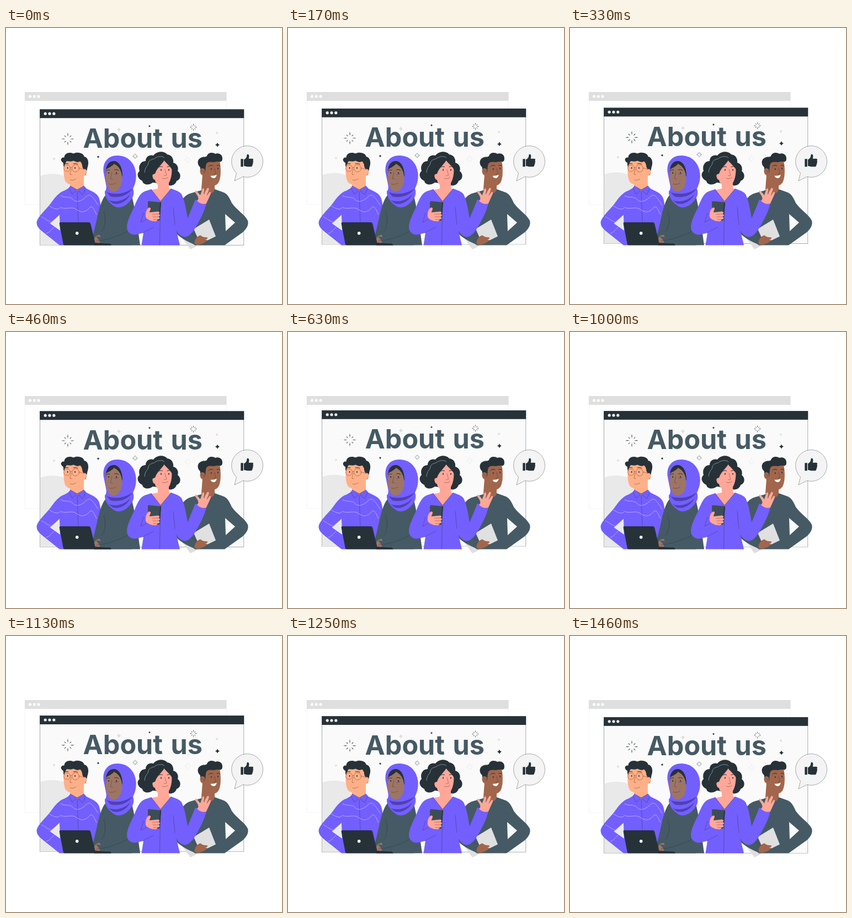
Write an HTML page that moves like this. It is 500 px wide and 500 px high and loops after 1.5 s.

```html
<!DOCTYPE html>
<html lang="en">
<head>
<meta charset="utf-8">
<title>About us</title>
<style>
  html, body { margin: 0; width: 100%; height: 100%; overflow: hidden; background: #fff; }
  svg { display: block; width: 100vw; height: 100vh; }
  #window { animation: float 1500ms linear infinite; }
  @keyframes float { 50% { transform: translateY(-6.5px); } }
  .title { font: 700 48.5px Inter, "Open Sans", sans-serif; fill: #455a64; word-spacing: 3px; }
  .dark { fill: #263238; }
  .slate { fill: #455a64; }
  .purple { fill: #735fff; }
  .shade { fill: #4f41b5; }
  .peach { fill: #ffb088; }
  .rose { fill: #ffa799; }
  .brown { fill: #9e7565; }
  .tan { fill: #a1664c; }
  .white { fill: #fff; }
  .line { fill: none; stroke: #263238; stroke-width: .4; stroke-linecap: round; stroke-linejoin: round; }
  .bold { stroke-width: 1; }
  .pale { stroke: #dcd7ff; stroke-width: .6; }
  .warm { stroke: #8f4f3c; stroke-width: .6; }
</style>
</head>
<body>
<svg viewBox="0 0 500 500" xmlns="http://www.w3.org/2000/svg">
  <g id="back">
    <rect x="34.2" y="116.4" width="365" height="203.4" fill="#fff" stroke="#ececec" stroke-width=".6"/>
    <rect x="34" y="116" width="365.4" height="16" fill="#dfdfdf"/>
    <g class="white"><circle cx="43.6" cy="124" r="2.6"/><circle cx="51.3" cy="124" r="2.6"/><circle cx="59" cy="124" r="2.6"/></g>
  </g>

  <g id="window">
    <rect x="61.5" y="147.6" width="369.4" height="246" fill="#fafafa" stroke="#263238" stroke-width=".4"/>
    <path d="M61.8 268C76 262.5 98 262.5 114 272L150 393.4H61.8Z" fill="#e9e9e9"/>
    <rect class="dark" x="61.2" y="147.4" width="370" height="15.8"/>
    <g fill="#f0f0f0"><circle cx="71.2" cy="155.2" r="2.6"/><circle cx="79" cy="155.2" r="2.6"/><circle cx="86.8" cy="155.2" r="2.6"/></g>
    <g id="sparks"></g>
    <text class="title" x="139.6" y="216.8">About us</text>
  </g>

  <g id="bubble">
    <path d="M417.5 262.5A28.4 28.4 0 1 1 429.5 269.3L414 277Z" fill="#f4f4f4" stroke="#263238" stroke-width=".4" stroke-linejoin="round"/>
    <path class="dark" d="M425.3 237.2H429.8V251.2H425.3ZM431 238.2C434.5 237 436.5 233.5 436.3 230.5C436.3 228.3 439.7 228 440.3 231.2C440.6 233.5 440 235.3 439.6 236.8H445.8C448.3 236.8 448.7 239.5 447.2 240.5C448.6 241.5 448.4 243.7 447 244.3C448 245.5 447.4 247.3 446.2 247.8C446.8 249.8 445.6 251.2 443.6 251.2H437C434.5 251.2 433.5 250 431 250Z"/>
  </g>

  <g id="man-glasses">
    <path class="purple" fill-rule="evenodd" d="M117 288L106 294.5C95 298 88 308 80 319C71 330 58 342 55.6 351C55 358 59 363 65 368L97 393.5H176L171 319C170 308 167 302 158 297L142 289ZM97 338.5L79.5 354L98 367Z"/>
    <path class="peach" d="M116 266H141V287C140 291 134 294 129 295C123 294 117 291 116 287Z"/>
    <path class="peach" d="M105.5 243C103.5 257 104 275 110 280.5C116 285.5 127 286 133 279C136 276 138 272 139.5 268C147 268 149 257 142 256L138 236L110 236Z"/>
    <path class="dark" d="M105.2 252C103 248 105 245 103 243.5C98 241 98.5 234 105.5 234.5C106 227 114 224 122 227.5C130 223.5 141 227 141.5 233C149 234 151 244 147.5 253C146.500 258 146 262 144 267C141 262 142.500 258 138.500 252C138 247 137 244 134 241.500C130 244.500 126 242 122 240.500C117 243 113 240.500 109.500 241.500C108 245 106 247 105.200 252Z"/>
    <path class="peach" d="M139 257C144 253 148.5 258 145 264C143 267.5 140 268 138.5 266Z"/>
    <g class="line warm"><circle cx="110.6" cy="254" r="5.9"/><circle cx="126" cy="254.3" r="6.5"/><path d="M116.5 253Q118 251.8 119.6 253M132.5 253.5L141 256M118 256L115.8 265.2L119.5 265.8"/></g>
    <g class="dark"><ellipse cx="111.6" cy="253.5" rx="1" ry="1.5"/><ellipse cx="125" cy="253.5" rx="1" ry="1.5"/></g>
    <path class="line bold" d="M107 246.3Q110 244.5 113 246M122 246Q126 244 130 246.7"/>
    <path class="line" d="M117 275.5Q122 277 127 273.500"/>
    <path class="purple" d="M116.5 286L129 293L120 301L113.5 290ZM141.5 286L129 293L139 302L145 290Z"/>
    <path class="line" d="M116.5 286L129 293L120 301L114 290M141.5 286L129 293L139 302L144.5 290M129 294L131 352"/>
    <path class="line pale" d="M99 304C109 309 116 304 122 311S139 312 146 305S159 309 167 321M98 325C110 330 118 322 128 329S145 333 151 326S160 331 164 338M78 322C85 326 90 330 97 327M64 342C71 345 75 350 81 351M73 372C79 371 83 364 87 361"/>
  </g>

  <g id="man-tablet">
    <path fill="#dedede" d="M313 372L334 401L354 391L340 362Z"/>
    <path class="slate" fill-rule="evenodd" d="M357 293L336 299C325 302 319 309 316 319L304 350C304 364 316 376 330 384L342 393.5H396L429 370C437 363 440 355 438 349C433 338 417 329 409 317C404 306 401 300 392 297L378 292ZM397 337L415 352.5L398 368Z"/>
    <path class="tan" d="M356 265H378V292C377 298 371 301 366 300C360 300 355 296 354 292Z"/>
    <path class="tan" d="M359 246C357 260 358 276 364 283C370 289 380 287 385 280C389 273 390 258 387.5 243L370 238Z"/>
    <path class="dark" d="M355 263C350 261 353 255 351.5 252C346 247 346 238 353 235C358 232 361 235 364 232C366 225 375 225 379 228C388 225 394 232 391.5 240C389 244 386 242 381 242C374 245 368 240 363 246C361 251 362 257 360 264Z"/>
    <path class="tan" d="M360 256C356 252 351 254 351.5 260C352 266 357 269 361 266Z"/>
    <path class="line" d="M354 258Q358 258 358.5 263M378 254.500L380.500 264.500L376.500 265"/>
    <g class="dark"><ellipse cx="371.8" cy="255.5" rx="1" ry="1.5"/><ellipse cx="384" cy="254.5" rx="1" ry="1.5"/></g>
    <path class="line bold" d="M367 250.5Q371 247 375 249.5M382 249Q385 247.5 387.5 249.5"/>
    <path class="white" d="M370.5 267.500Q377 268.500 381.500 265.500Q381 272.500 376 272Q371.500 271.500 370.500 267.500Z"/>
    <path fill="#e0e0e0" d="M340 364L368 347L380 377.5L352 391Z"/>
    <path class="tan" d="M341 389C343 382 346 377 352 375.5L357 378.5L365 379.5C366 381 364 383 360 383L365 384C362 388 356 391 350 392.5C346 393.5 342 392 341 389Z"/>
    <path class="slate" d="M308 360L344 377C342 382 341 387 341 392C328 387 314 379 306 370Z"/>
    <path class="line" d="M312 361L344 377"/>
  </g>

  <g id="woman-scarf">
    <path class="slate" d="M182 301C176 306 171 319 167 335C164 350 160 365 157 379L161 393.5H243C239 365 235 333 228 304Z"/>
    <path class="purple" d="M177 263C174 244 184 231 202 231C221 231 234 245 235.5 264C236.5 276 233 285 230 291C233 298 231 307 224 314C217 323 207 327 198 324C187 318 178 306 179 296C183 292 182 287 180 278Z"/>
    <path class="dark" d="M181 262C180 249 187 240 196 241C206 242 211 254 211 268L204 277Z"/>
    <path class="brown" d="M181.5 256C188 252 193 250 195.500 246C203 249 211 258 210.5 275C210 287 202 298 193 296.5C185 295 181 283 181 271Z"/>
    <path class="shade" d="M182 297C195 303 216 301 230 290C221 304 203 309 189 305ZM186 312C200 317 217 312 226 300C219 315 205 321 194 318Z"/>
    <g class="dark"><ellipse cx="186.2" cy="262.5" rx="1" ry="1.5"/><ellipse cx="200" cy="262.5" rx="1" ry="1.5"/></g>
    <path class="line bold" d="M182.5 258Q185 256 188 257.5M196.5 257Q200 255 204 258"/>
    <path class="line" d="M192 261L189 273L193 273.5M197 265Q200 266 203 264M187 282.500Q193 285 199 281"/>
    <path class="brown" d="M159 388C159 380 163 374 170 375L174 385L168 390Z"/>
    <path class="slate" d="M163 377C179 382 197 375 216 363L228 393.5H175Z"/>
    <path class="line" d="M177 333C181 345 181 357 174 368M164 386C182 385 203 377 222 368"/>
  </g>

  <g id="laptop" class="dark">
    <path d="M98.5 352H150Q152.500 352 153.200 354.500L162.500 393.500H106Q104.300 393.500 103.800 391.500L96.700 354.500Q96.300 352 98.500 352Z"/>
    <path d="M160 389L188 390.5Q190.5 391 190.5 393.8H160Z"/>
    <circle cx="128.7" cy="371.8" r="2.8" fill="#fff"/>
  </g>

  <g id="woman-phone">
    <path class="dark" d="M267 231C273 223 286 222 292 229C301 230 304 238 303 244C311 246 313 254 311 259C318 264 317 275 309 277C307 285 297 288 291 283L266 280C258 286 248 284 247 277C238 273 236 264 242 259C239 250 244 241 253 241C253 233 260 229 267 231Z"/>
    <path class="rose" d="M275 277H295V290L300 293L280 320L261 294L275 291Z"/>
    <path class="rose" d="M269 253C268 266 268 278 275 284C282 289 292 286 296 279C300 271 302 258 299 246C295 236 285 235 278 243Z"/>
    <path class="dark" d="M266 264C264 249 272 234 285 234C296 234 303 244 302 259C298 250 291 246 286.500 240C283 247 274 252 270 264Z"/>
    <path d="M271 267C267 262 264 266 266 271C267 275 270 276 272 274Z" class="rose"/>
    <path d="M251 262C252 250 258 250 258 244C260 237 267 239 271 235C277 232 283 232 287 235" fill="none" stroke="#dfe3e5" stroke-width=".5"/>
    <g class="dark"><ellipse cx="281" cy="257" rx="1" ry="1.5"/><ellipse cx="295" cy="257" rx="1" ry="1.5"/></g>
    <path class="line bold" d="M277 252Q280 249.5 283.5 251.5M292 251.5Q295 249.500 298.500 251.500"/>
    <path class="line warm" d="M288 256L290.8 267L286.5 267.5"/>
    <path class="line" d="M283 272Q288 274.500 293.500 271"/>
    <path class="purple" d="M263 292L251 296C242 300 238 310 233 322C227 336 219 349 219 361C219 370 227 376 237 374L249 371L245.5 393.5H315L306 356C307 368 314 377 323 378.5C333 379 340 367 346 357C354 343 360 330 363 318L343 311L329 345C326 328 324 313 318 301C314 296 308 294 299 291L280 314Z"/>
    <path class="line" d="M263 292.500L280 314L299 291.500M280 314L278.500 393M306 356L303 325M248 371L267 361M249 335L244 352L253 347"/>
    <path d="M259.5 313.7L279 315.5Q281.3 315.8 281 318L278 347Q277.7 349.3 275.5 349L260 347.5Q257.5 347 257.5 345L257 316Q257 313.5 259.5 313.7Z" fill="#3d4d56"/>
    <path class="line" style="stroke-width:1.800" d="M280 317L277.300 347.500"/>
    <path class="rose" d="M253 338C253 330 258 324 261 325.5C264 327 260 331 260 334L275 332.5C279 332.5 279 336 275.5 337L278 337.5C280 340 278 341.5 275.5 342L278 343C279.5 346 276 347 273 347L274.500 348.500C272 351.500 265 350 261 348.500C255 346 252 343 253 338Z"/>
    <path class="line warm" d="M265 337.5L275.5 337M266 342.3L275.5 342M267 346.8L273 347"/>
    <path class="rose" d="M346 313C349 311 349 308 347 304L343 298C341.5 294.5 344.5 293.5 346.5 296.5L352 303L355.5 292.5C356.5 289.5 359.5 290 359 293.5L358 302L364 291C366 288.5 368.5 290 367.5 293L363.5 304L368 298C370.5 295.5 372 298 370.5 301C368 307 366 311 363 318C357 320 351 318 346 313Z"/>
  </g>
</svg>
<script>
  const NS = "http://www.w3.org/2000/svg";
  const sparks = document.getElementById("sparks");

  function addPath(d, fill) {
    const path = document.createElementNS(NS, "path");
    path.setAttribute("d", d);
    path.setAttribute("fill", fill);
    sparks.append(path);
  }

  function star(x, y, r, fill) {
    const k = r * 0.22;
    addPath(`M${x} ${y - r}Q${x + k} ${y - k} ${x + r} ${y}Q${x + k} ${y + k} ${x} ${y + r}` +
      `Q${x - k} ${y + k} ${x - r} ${y}Q${x - k} ${y - k} ${x} ${y - r}Z`, fill);
  }

  // Eight slim rays, the diagonal ones shorter.
  function burst(x, y, r, fill) {
    let d = "";
    for (let i = 0; i < 8; i++) {
      const a = i * Math.PI / 4;
      const point = (dist, side) =>
        `${x + dist * Math.cos(a) - side * Math.sin(a)} ${y + dist * Math.sin(a) + side * Math.cos(a)}`;
      const end = i % 2 ? r * 0.8 : r;
      const mid = (end + r * 0.35) / 2;
      const half = r * 0.02 + 0.35;
      d += `M${point(r * 0.35, 0)}L${point(mid, half)}L${point(end, 0)}L${point(mid, -half)}Z`;
    }
    addPath(d, fill);
  }

  const dark = "#263238", light = "#dedede";
  burst(112, 201, 12, dark);
  burst(339.5, 179.8, 6.8, dark);
  burst(234, 232.3, 5, dark);
  burst(329, 239, 6.5, light);
  star(204.5, 184, 4, light);
  star(382, 190, 2.8, light);
  star(87, 237, 2.8, light);
  star(167, 233.5, 2.4, dark);
  star(260, 177.8, 2.2, dark);
  star(383, 211.8, 4, dark);
</script>
</body>
</html>
```
